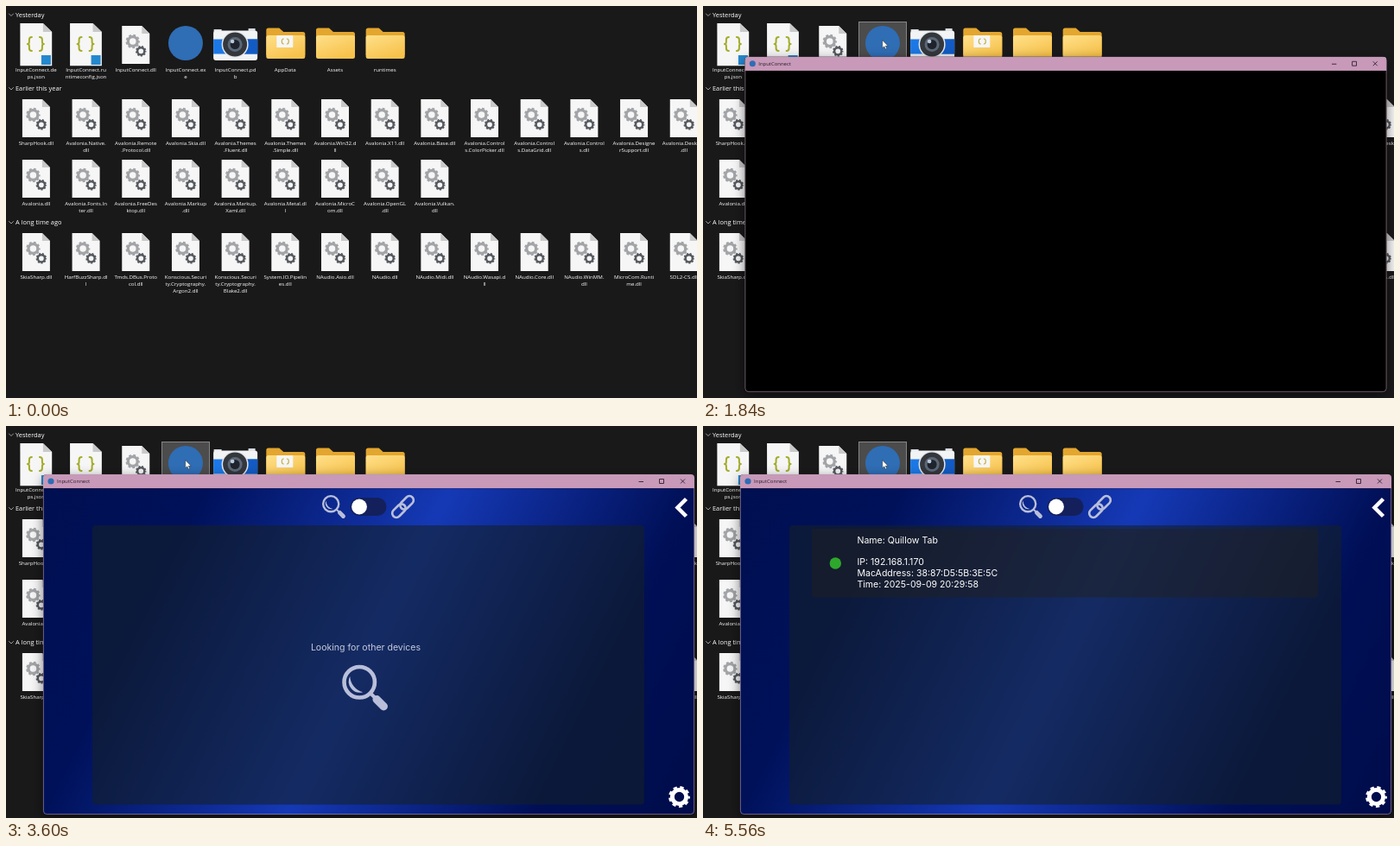
Recreate the animation shown at these times as an HTML page. Size 800x454 px, loop 5600 ms.

```html
<!DOCTYPE html>
<html lang="en">
<head>
<meta charset="utf-8">
<title>Device discovery</title>
<style>
  html, body { margin: 0; width: 100%; height: 100%; overflow: hidden; background: #191919; }
  svg { display: block; width: 800px; height: 454px; }
  text { font-family: "Open Sans", "Noto Sans", sans-serif; fill: #fff; }
  .label { font-size: 6.15px; font-weight: 500; text-anchor: middle; }
  .heading { font-size: 7.4px; }
  .app { font-family: Inter, "Liberation Sans", sans-serif; font-size: 10.56px; white-space: pre; }
  .line { fill: none; stroke-linecap: round; stroke-linejoin: round; }
</style>
</head>
<body>
<svg viewBox="0 0 800 454">
  <defs>
    <linearGradient id="blue" gradientUnits="userSpaceOnUse" x1="43" y1="72" x2="797" y2="450">
      <stop offset="0" stop-color="#000f50"/>
      <stop offset=".2" stop-color="#00115a"/>
      <stop offset=".5" stop-color="#1539b6"/>
      <stop offset=".8" stop-color="#000f56"/>
      <stop offset="1" stop-color="#000c4a"/>
    </linearGradient>
    <linearGradient id="yellow" x2=".6" y2="1">
      <stop offset="0" stop-color="#ffe08a"/>
      <stop offset="1" stop-color="#f7c24c"/>
    </linearGradient>
    <filter id="shadow" x="-10%" y="-10%" width="120%" height="125%">
      <feDropShadow dx="0" dy="4" stdDeviation="7" flood-opacity=".5"/>
    </filter>
    <clipPath id="frame"><rect x="43" y="56" width="754" height="394" rx="4"/></clipPath>

    <!-- Gear with unit radius, coloured by the user -->
    <g id="gear" fill="none" stroke="currentColor">
      <circle r=".66" stroke-width=".4"/>
      <circle r=".87" stroke-width=".28" pathLength="16" stroke-dasharray="1.1 .9" stroke-dashoffset=".55"/>
    </g>
    <g id="page">
      <path d="M0 0H23L32 9V44H0Z" fill="#f6f6f6"/>
      <path d="M23 0V9H32Z" fill="#c9c9c9"/>
    </g>
    <g id="dll">
      <use href="#page"/>
      <use href="#gear" transform="translate(12.5 18) scale(8.2)" color="#a2a4a7"/>
      <use href="#gear" transform="translate(22 29.3) scale(6.2)" color="#55595f"/>
    </g>
    <g id="json">
      <use href="#page" transform="translate(-2.5 -3) scale(1.15 1.12)"/>
      <path class="line" stroke="#a4ac2b" stroke-width="2" d="M11 13q-3 0-3 3v2.500q0 2.500-2 2.500q2 0 2 2.500v2.500q0 3 3 3M20 13q3 0 3 3v2.500q0 2.500 2 2.500q-2 0-2 2.500v2.500q0 3-3 3"/>
      <rect x="22" y="34" width="11" height="11" fill="#2488cf"/>
    </g>
    <circle id="app" cx="16" cy="20" r="20" fill="#2f6db5"/>
    <g id="camera">
      <path d="M-9 7V4H0V7ZM31 6V3H39V6Z" fill="#d9dde2"/>
      <rect x="-9.500" y="5.500" width="51" height="34.500" rx="3" fill="#f1f3f5"/>
      <path d="M-9.500 15.500H41.500V32.500H-9.500Z" fill="#1c78e6"/>
      <path d="M29 15.500H41.500V32.500H24Z" fill="#125bc4"/>
      <circle cx="15.500" cy="21.500" r="15.500" fill="#e4e7ea"/>
      <circle cx="15.500" cy="21.500" r="14" fill="#34373c"/>
      <circle cx="15.500" cy="21.500" r="8.500" fill="#5c6878"/>
      <circle cx="15.500" cy="21.500" r="5.500" fill="#1e232c"/>
      <circle cx="12.500" cy="18" r="2.300" fill="#b9c9dc"/>
    </g>
    <g id="back"><path d="M-6 5q0-2.500 2.500-2.500H9l5 4.500H36.500q2.500 0 2.500 2.500V34H-6Z" fill="#e3a62f"/></g>
    <g id="front"><rect x="-6" y="11" width="45" height="27" rx="2.500" fill="url(#yellow)"/></g>
    <g id="folder">
      <use href="#back"/><use href="#front"/>
    </g>
    <g id="filled">
      <use href="#back"/><use href="#front"/>
      <rect x="6" y="11" width="19" height="14" fill="#f6f6f6"/>
      <path class="line" stroke="#c2b04a" stroke-width="1.200" d="M14 15q-2 0-2 3t2 3M18 15q2 0 2 3t-2 3"/>
    </g>
    <g id="lens" color="#b9bfda">
      <circle cx="-6.500" cy="-6.500" r="17.700" fill="none" stroke="currentColor" stroke-width="4.600"/>
      <path d="M-17.500-13.500A13 13 0 0 0-2.500 5A20 20 0 0 1-17.500-13.500Z" fill="currentColor"/>
      <path class="line" stroke="currentColor" stroke-width="4" d="M7 7L13 13"/>
      <path class="line" stroke="currentColor" stroke-width="9.500" d="M13.500 13.500L21.500 21.500"/>
    </g>
  </defs>

  <rect width="800" height="454" fill="#191919"/>
  <rect id="select" x="180.500" y="18.500" width="55" height="68"/>
  <g id="files"></g>

  <g id="window">
    <rect x="43" y="56" width="754" height="394" rx="4" filter="url(#shadow)"/>
    <g clip-path="url(#frame)">
      <rect x="43" y="56" width="754" height="16.300" fill="#c899b9"/>
      <circle cx="52" cy="64" r="3.600" fill="#2f6db5"/>
      <text x="59" y="66.300" style="font-size:6.050px;fill:#261c26">InputConnect</text>
      <path d="M732.500 64.500H738M756.500 61.500H761.500V66.500H756.500ZM781 61.500L786 66.500M786 61.500L781 66.500" fill="none" stroke="#2b222b" stroke-width=".9"/>
      <g id="content">
        <rect x="43" y="72.300" width="754" height="378" fill="url(#blue)"/>
        <use href="#lens" transform="translate(379.500 93.500) scale(.51)"/>
        <rect x="398.500" y="83" width="42" height="21" rx="10.500" fill="#13205c"/>
        <circle cx="409" cy="93.500" r="8.900" fill="#fff"/>
        <g transform="translate(459.500 93.500) rotate(-45)" fill="none" stroke="#b9bfda" stroke-width="2.600">
          <rect x="-15.500" y="-4.800" width="18" height="9.600" rx="4.800"/>
          <rect x="-2.500" y="-4.800" width="18" height="9.600" rx="4.800"/>
        </g>
        <path d="M787.500 84.500L777.500 94.500L787.500 104.500" fill="none" stroke="#fff" stroke-width="4.500"/>
        <rect x="100" y="115" width="639" height="323.500" rx="4" fill="#152025" opacity=".57"/>
        <use href="#gear" transform="translate(779.500 429.500) scale(12.300)" color="#fff"/>
        <g id="search">
          <text class="app" x="416.500" y="260.300" text-anchor="middle" style="fill:#c6cadd">Looking for other devices</text>
          <use id="seeker" href="#lens"/>
        </g>
        <g id="device">
          <rect x="126" y="119" width="586" height="79.500" rx="3" fill="#202020" opacity=".5"/>
          <circle cx="153.300" cy="159" r="6.700" fill="#2ea82c"/>
          <text class="app" x="178.500" y="135.500">Name: Quillow Tab</text>
          <text class="app" x="178.500" y="161.100">IP: 192.168.1.170</text>
          <text class="app" x="178.500" y="173.900">MacAddress: 38:87:D5:5B:3E:5C</text>
          <text class="app" x="178.500" y="186.700">Time: 2025-09-09 20:29:58</text>
        </g>
      </g>
    </g>
    <rect x="43.400" y="56.400" width="753.200" height="393.200" rx="4" fill="none" stroke="#b79bb0" stroke-opacity=".75" stroke-width=".8"/>
  </g>
  <path id="cursor" d="M0 0V9.200L2.100 7.300L3.500 10.500L5 9.800L3.600 6.800H6.500Z" fill="#fff" stroke="#222" stroke-width=".5"/>
</svg>

<script>
const $ = id => document.getElementById(id);
const LOOP = 5600, ENTER = 250, ARRIVE = 650, CLICK = 900, OPEN = 1720, READY = 2040, FOUND = 4720;
const clamp = v => Math.max(0, Math.min(1, v));
const show = (id, on) => $(id).setAttribute("visibility", on ? "inherit" : "hidden");

const headings = [[10, "Yesterday"], [95.5, "Earlier this year"], [250.5, "A long time ago"]];
// Files are separated by spaces, label lines by bars.
const rows = [
  [23, "InputConnect.de|ps.json InputConnect.ru|ntimeconfig.json InputConnect.dll InputConnect.ex|e InputConnect.pd|b AppData Assets runtimes"],
  [108, "SharpHook.dll Avalonia.Native.|dll Avalonia.Remote|.Protocol.dll Avalonia.Skia.dll Avalonia.Themes|.Fluent.dll Avalonia.Themes|.Simple.dll Avalonia.Win32.d|ll Avalonia.X11.dll Avalonia.Base.dll Avalonia.Control|s.ColorPicker.dll Avalonia.Control|s.DataGrid.dll Avalonia.Control|s.dll Avalonia.Designe|rSupport.dll Avalonia.Desktop|.dll"],
  [178, "Avalonia.dll Avalonia.Fonts.In|ter.dll Avalonia.FreeDes|ktop.dll Avalonia.Markup|.dll Avalonia.Markup.|Xaml.dll Avalonia.Metal.dl|l Avalonia.MicroC|om.dll Avalonia.OpenGL|.dll Avalonia.Vulkan.|dll"],
  [263, "SkiaSharp.dll HarfBuzzSharp.dl|l Tmds.DBus.Proto|col.dll Konscious.Securi|ty.Cryptography.|Argon2.dll Konscious.Securi|ty.Cryptography.|Blake2.dll System.IO.Pipelin|es.dll NAudio.Asio.dll NAudio.dll NAudio.Midi.dll NAudio.Wasapi.d|ll NAudio.Core.dll NAudio.WinMM.|dll MicroCom.Runti|me.dll SDL2-CS.dll"]
];
const topIcons = ["json", "json", "dll", "app", "camera", "filled", "folder", "folder"];

function fileMarkup(name, col, row, top) {
  const x = 34.9 + col * 57.68;
  const lines = name.split("|").map((s, i) =>
    `<text class="label" x="${x}" y="${top + 53.2 + i * 7.9}">${s}</text>`).join("");
  const icon = row ? "dll" : topIcons[col];
  return `<use href="#${icon}" x="${x - 16}" y="${top}"/>${lines}`;
}

$("files").innerHTML = headings.map(([y, s]) =>
  `<path class="line" d="M3.500 ${y - 1}l2.500 2.500l2.500-2.500" stroke="#bbb" stroke-width=".8"/>
   <text class="heading" x="11" y="${y + 2.7}">${s}</text>`).join("") +
  rows.map(([top, names], row) =>
    names.split(" ").map((name, col) => fileMarkup(name, col, row, top)).join("")).join("");

function draw(t) {
  // Pointer slides in from the top and selects the program.
  const left = (1 - clamp((t - ENTER) / (ARRIVE - ENTER))) ** 2;
  const x = 207.7 + 62 * left, y = 39.5 - 52 * left;
  $("cursor").setAttribute("transform", `translate(${x} ${y})`);
  show("select", x < 236 && y > 18);
  $("select").setAttribute("fill", t < CLICK ? "#333" : "#4c4c4c");
  $("select").setAttribute("stroke", t < CLICK ? "#333" : "#858585");

  const scale = 1 - 0.1 * (1 - clamp((t - OPEN) / 255)) ** 3;
  show("window", t >= OPEN);
  $("window").setAttribute("opacity", clamp((t - OPEN) / 80));
  $("window").setAttribute("transform", `translate(420 253) scale(${scale}) translate(-420 -253)`);

  show("content", t >= READY);
  show("search", t < FOUND);
  show("device", t >= FOUND);
  // The magnifier circles counterclockwise.
  const a = (74 - 0.579 * (t - 2680)) * Math.PI / 180;
  $("seeker").setAttribute("transform",
    `translate(${420 + 26.6 * Math.cos(a)} ${329.5 + 26.6 * Math.sin(a)})`);
}

const start = performance.now();
function tick() {
  draw((performance.now() - start) % LOOP);
  requestAnimationFrame(tick);
}
tick();
</script>
</body>
</html>
```
